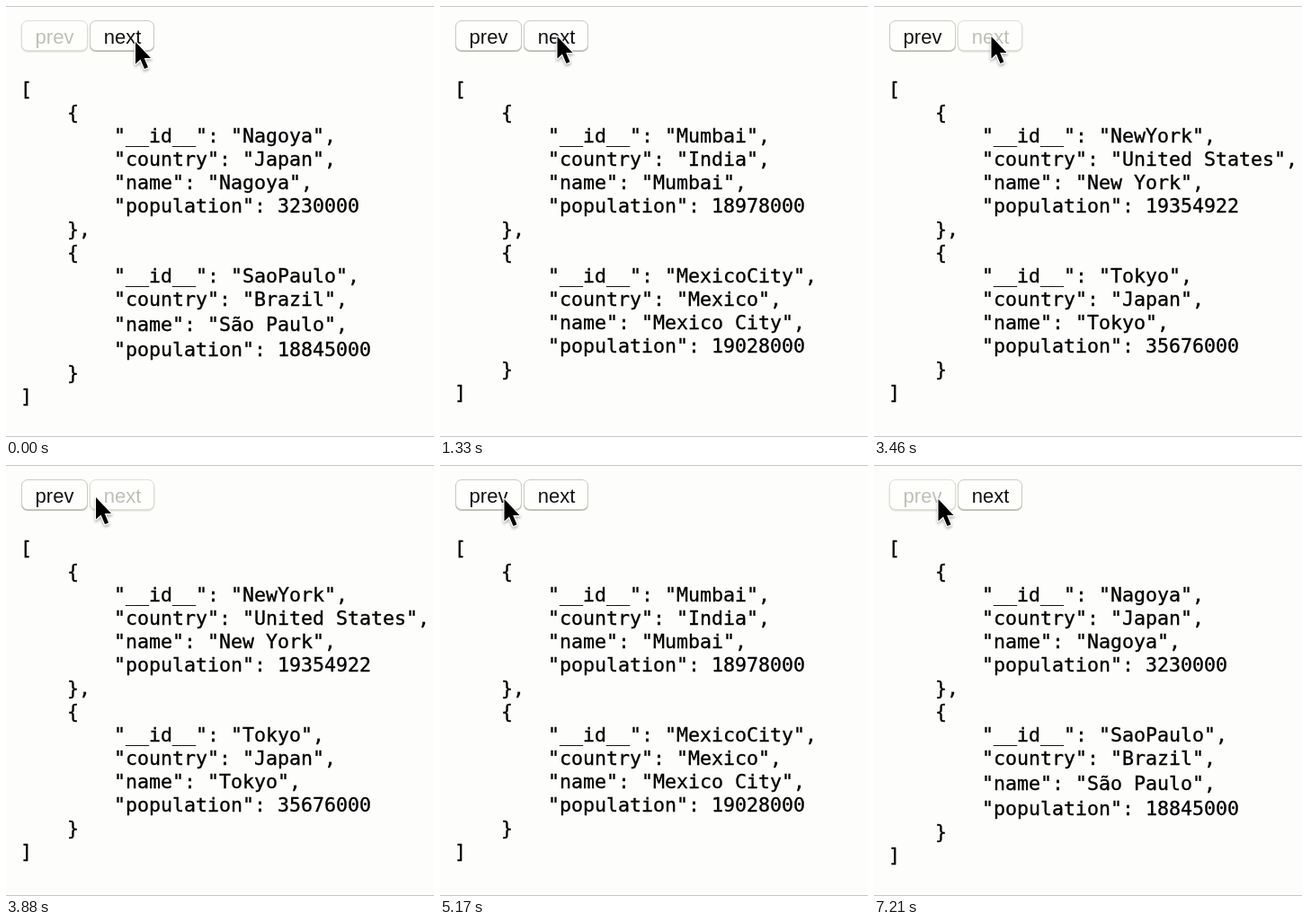
An HTML page that plays this animation: 476x480 px, repeating every 7.25 s.

```html
<!DOCTYPE html>
<html lang="en">
<head>
<meta charset="utf-8">
<title>Paged city list</title>
<style>
  html, body { margin: 0; width: 476px; height: 480px; overflow: hidden; background: #fdfdfc; }
  svg { display: block; }
  #json text { font: 21.6px "DejaVu Sans Mono", monospace; white-space: pre; fill: #000; stroke: #000; stroke-width: .35px; }
  .button text { font: 22px "Liberation Sans", Arial, sans-serif; text-anchor: middle; fill: #111; }
  .button rect { fill: #fefefd; stroke: #cbcbc2; }
  .button .shade { fill: #b9b9b0; stroke: none; }
  .button.off text { fill: #bfbfb6; }
  .button.off rect { stroke: #dfdfd6; }
  .button.off .shade { fill: #dfdfd6; }
</style>
</head>
<body>
<svg width="476" height="480" viewBox="0 0 476 480">
  <path d="M0 .5H476M0 479.5H476" stroke="#c6c6c2"/>
  <g class="button" id="prev">
    <rect class="shade" x="17" y="17" width="74" height="34" rx="7"/>
    <rect x="17.5" y="16.5" width="73" height="33" rx="6.5"/>
    <text x="54" y="42">prev</text>
  </g>
  <g class="button" id="next">
    <rect class="shade" x="93" y="17" width="72" height="34" rx="7"/>
    <rect x="93.5" y="16.5" width="71" height="33" rx="6.5"/>
    <text x="129.5" y="42">next</text>
  </g>
  <g id="json"></g>
  <g id="cursor">
    <path d="M0 0V24.5L5.5 19.5L10 30L14 28.3L9.7 18H17Z" fill="#000" stroke="#fff"
      stroke-width="2.4" stroke-linejoin="round" paint-order="stroke"
      style="filter: drop-shadow(0 2px 1.5px rgba(0,0,0,.3))"/>
  </g>
</svg>
<script>
const LOOP = 7250;
const $ = id => document.getElementById(id);

const cities = [
  ["Nagoya", "Japan", "Nagoya", 3230000],
  ["SaoPaulo", "Brazil", "São Paulo", 18845000],
  ["Mumbai", "India", "Mumbai", 18978000],
  ["MexicoCity", "Mexico", "Mexico City", 19028000],
  ["NewYork", "United States", "New York", 19354922],
  ["Tokyo", "Japan", "Tokyo", 35676000]
];
const keys = ["__id__", "country", "name", "population"];

// [time, page] and [start, end, x, y]
const pages = [[0, 0], [1050, 1], [2640, 2], [4850, 1], [6400, 0]];
const moves = [[0, 0, 144, 40], [150, 650, 130.5, 34], [3600, 4150, 71.5, 38]];

function pageLines(page) {
  const rows = cities.slice(page * 2, page * 2 + 2)
    .map(city => Object.fromEntries(keys.map((key, i) => [key, city[i]])));
  return JSON.stringify(rows, null, 4).split("\n");
}

function showPage(page) {
  let y = 100;
  $("json").replaceChildren(...pageLines(page).map(line => {
    const text = document.createElementNS("http://www.w3.org/2000/svg", "text");
    const tall = line.includes("ã"); // the accented line is taller
    const indent = line.search(/\S/);
    if (tall) y += 2;
    text.setAttribute("x", 16 + indent * 13);
    text.setAttribute("y", y);
    text.textContent = line.trim();
    y += tall ? 28 : 26;
    return text;
  }));
  $("prev").classList.toggle("off", page === 0);
  $("next").classList.toggle("off", page === 2);
}

function cursorAt(t) {
  let [, , x, y] = moves[0];
  for (const [start, end, toX, toY] of moves.slice(1)) {
    const p = Math.min(1, Math.max(0, (t - start) / (end - start)));
    const ease = p * p * (3 - 2 * p);
    x += (toX - x) * ease;
    y += (toY - y) * ease;
  }
  return [x, y];
}

let shown = -1;
function draw(now) {
  const t = now % LOOP;
  const page = pages.findLast(([start]) => t >= start)[1];
  if (page !== shown) showPage(shown = page);
  $("cursor").setAttribute("transform", `translate(${cursorAt(t)})`);
  requestAnimationFrame(draw);
}
draw(0);
</script>
</body>
</html>
```
